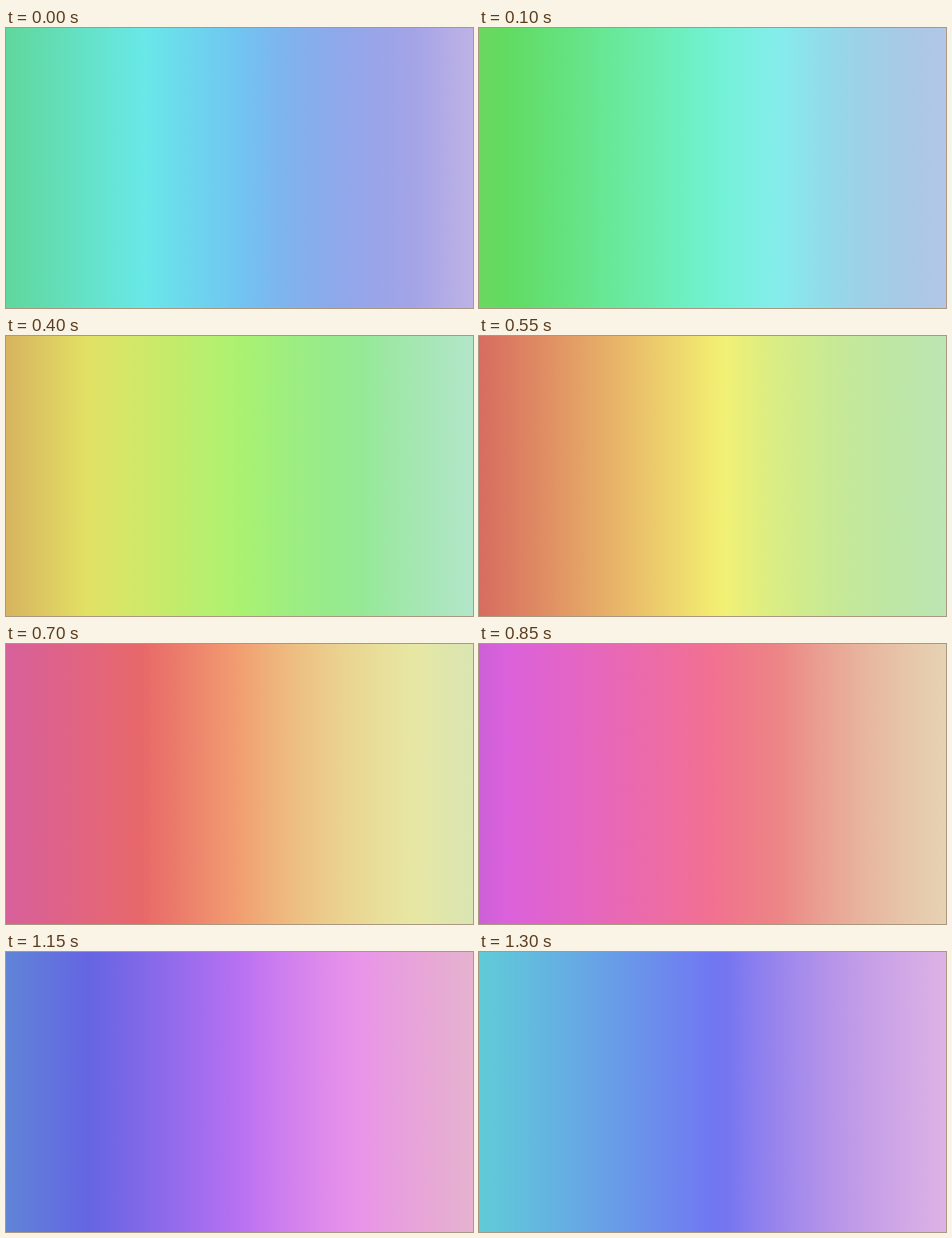
An HTML page with a canvas that plays this animation: 500x300 px, repeating every 1.45 s.

```html
<!DOCTYPE html>
<html lang="en">
<head>
<meta charset="utf-8">
<title>Hue sweep</title>
<style>
  html, body { margin: 0; width: 100%; height: 100%; overflow: hidden; }
  canvas { display: block; width: 100vw; height: 100vh; }
</style>
</head>
<body>
<canvas id="stage" width="500" height="300"></canvas>
<script>
const canvas = document.getElementById('stage');
const ctx = canvas.getContext('2d');
const LOOP = 1450, FIRST = 100, STEP = 150, STEPS = 10;

// Hue offset, saturation and lightness at the left, middle and right.
const keys = [[0, 60, 61], [51, 83, 69.5], [103, 50, 80]];

const mix = (a, b, k) => a + (b - a) * k;

function colorAt(u, hue) {
  const i = u < 0.5 ? 0 : 1;
  const k = u * 2 - i;
  const [h, s, l] = keys[i].map((v, j) => mix(v, keys[i + 1][j], k));
  return `hsl(${(hue + h + 360) % 360}, ${s}%, ${l}%)`;
}

function draw(step) {
  const hue = 150 - step * 360 / STEPS;
  const gradient = ctx.createLinearGradient(0, 0, canvas.width, 0);
  const stops = 100;
  for (let i = 0; i <= stops; i++) {
    gradient.addColorStop(i / stops, colorAt(i / stops, hue));
  }
  ctx.fillStyle = gradient;
  ctx.fillRect(0, 0, canvas.width, canvas.height);
}

// The first step is shorter than the others.
function stepAt(ms) {
  const t = ms % LOOP;
  return t < FIRST ? 0 : 1 + Math.floor((t - FIRST) / STEP);
}

const start = performance.now();
function tick() {
  draw(stepAt(Math.max(0, performance.now() - start)));
  requestAnimationFrame(tick);
}
tick();
</script>
</body>
</html>
```
